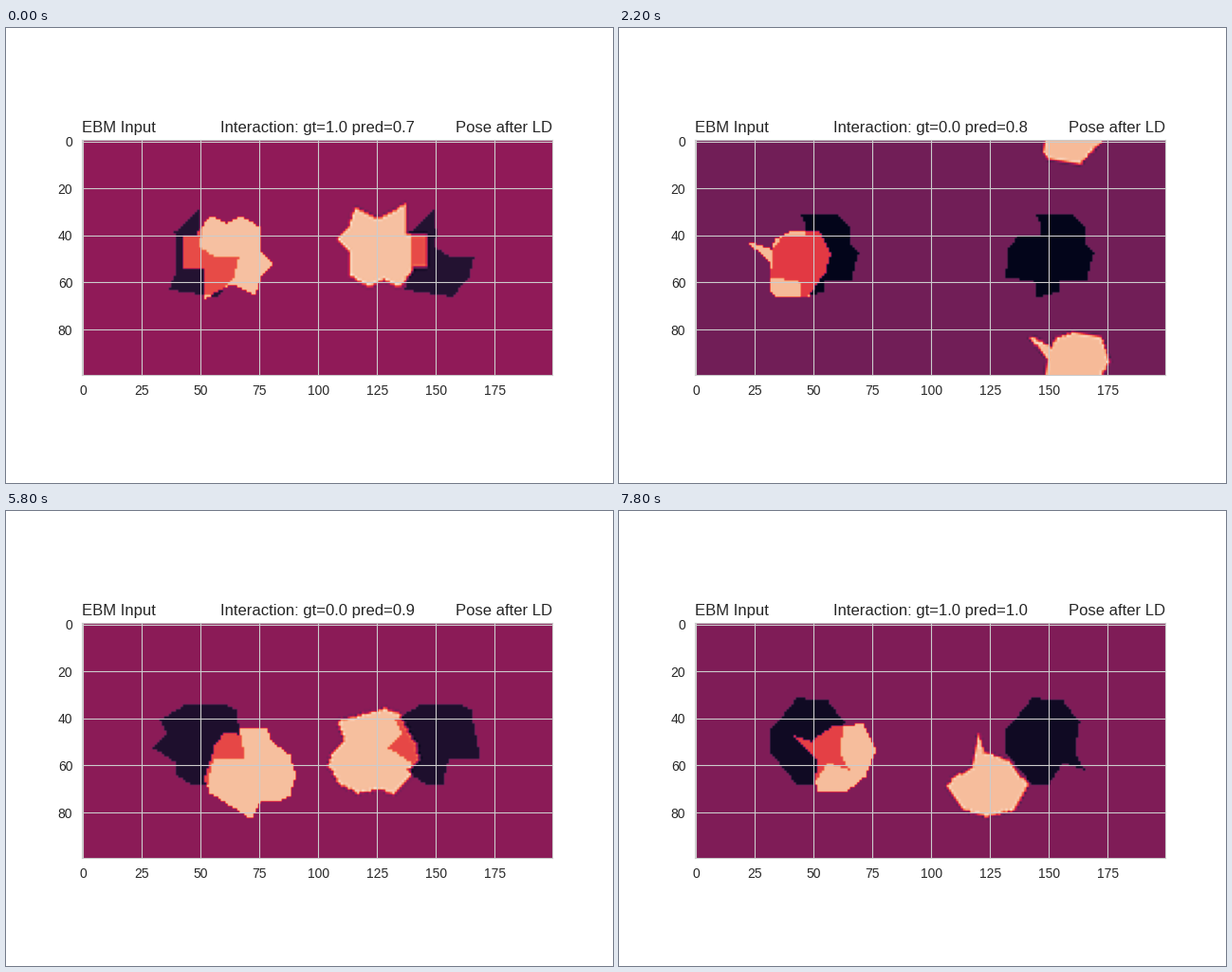
These frames come from a looping animation (640x480 px, 8000 ms). A matplotlib script:

```python
import numpy as np
import matplotlib.pyplot as plt
from matplotlib.animation import FuncAnimation
from matplotlib.colors import LinearSegmentedColormap
from matplotlib.path import Path

plt.rcParams.update({
    "font.family": "Liberation Sans", "text.color": "0.15",
    "xtick.labelcolor": "0.15", "ytick.labelcolor": "0.15",
    "axes.edgecolor": "0.8", "axes.axisbelow": True, "grid.color": "0.8",
})

N = 100            # cells per panel side
STEPS = 10         # Langevin steps shown per example
MID = (N - 1) / 2
PAD = 30
TOP = 2.43         # upper colour limit
rocket = LinearSegmentedColormap.from_list("rocket", [
    "#03051a", "#35193e", "#701f57", "#ad1759",
    "#e13342", "#f37651", "#f6b48f", "#faebdd"])

ROWS, COLS = np.mgrid[0:N, 0:N].astype(float)
CELLS = np.column_stack([COLS.ravel(), ROWS.ravel()])


def blob(*corners):
    """Rasterise a polygon on the panel grid."""
    return Path(corners).contains_points(CELLS).reshape(N, N).astype(float)


def cubic(t, a=-0.75):
    """Cubic convolution kernel; its overshoot gives the light rims."""
    t = np.abs(t)
    near = (a + 2) * t**3 - (a + 3) * t**2 + 1
    far = a * (t**3 - 5 * t**2 + 8 * t - 4)
    return np.where(t <= 1, near, np.where(t < 2, far, 0))


def move(mask, dx, dy, angle):
    """Rotate about the panel centre, then shift with wrap-around."""
    c, s = np.cos(np.radians(angle)), np.sin(np.radians(angle))
    u = (COLS - MID - dx + N / 2) % N - N / 2
    v = (ROWS - MID - dy + N / 2) % N - N / 2
    x, y = c * u + s * v + MID, -s * u + c * v + MID
    x0, y0 = np.floor(x).astype(int), np.floor(y).astype(int)
    padded = np.pad(mask, PAD)
    out = np.zeros((N, N))
    for i in range(-1, 3):
        for j in range(-1, 3):
            weight = cubic(x - x0 - i) * cubic(y - y0 - j)
            out += weight * padded[y0 + j + PAD, x0 + i + PAD]
    return out


# start and end: dx, dy, angle, lower colour limit
EXAMPLES = [
    dict(gt=1.0, pred=0.7,
         receptor=blob((49, 29.5), (50.4, 40), (49, 45), (55, 49), (66.5, 49),
                       (64, 58), (57, 66.4), (36.5, 63.4), (40, 55),
                       (39, 39)),
         ligand=blob((42.5, 41), (43, 54.4), (51.5, 55), (51.5, 67.4),
                     (63, 61), (73, 65.6), (76, 58), (81, 52.6), (75.4, 47),
                     (75.4, 37), (67, 32), (61, 35), (54, 32), (48, 40)),
         start=(-10.2, -4.6, 180, -1.37), end=(-31.4, 8.8, 184, -0.9)),
    dict(gt=0.0, pred=0.8,
         receptor=blob((44, 31), (59, 31), (65.5, 37), (65, 43), (69, 48),
                       (66, 59), (54.4, 59), (54.4, 64.4), (45, 66.5),
                       (44, 60), (31.6, 58), (33, 46), (37, 40.6),
                       (46.6, 41), (46.6, 36)),
         ligand=blob((21.5, 43), (32, 46), (34, 42), (41, 38), (52, 38),
                     (57.4, 48), (55, 56), (48, 66.4), (34, 66.4),
                     (31.6, 64), (32, 52)),
         start=(23.4, 44.2, 10, -1), end=(-23.4, 44.2, 4, -1)),
    dict(gt=0.0, pred=0.9,
         receptor=blob((30, 53), (36, 47), (33, 41), (43, 35), (60, 34),
                       (65, 37), (69, 57.4), (55.4, 57.4), (53, 68.4),
                       (46, 68.4), (39.5, 64), (39.5, 59)),
         ligand=blob((60, 46.6), (66, 47), (67, 44.6), (78.4, 44.6),
                     (80, 50), (88, 56), (90.6, 64), (88, 73), (84, 75.4),
                     (75.4, 75.4), (72, 82.4), (70, 82), (54, 72),
                     (51.5, 66), (56, 52)),
         start=(0.2, -1, 203.5, -1.48), end=(-1.6, -1.2, 133, -1.3)),
    dict(gt=1.0, pred=1.0,
         receptor=blob((43, 31.6), (56, 33), (63, 42), (61, 55), (65, 62),
                       (56, 59), (50, 68.4), (43, 68.4), (31.6, 55),
                       (31.6, 45), (38, 38)),
         ligand=blob((40.5, 47.5), (49, 50), (58, 44), (71, 42.6),
                     (76.5, 54), (72, 65), (64, 71.4), (52, 71.4),
                     (50.5, 67), (52, 58)),
         start=(-24.9, 4.2, 44.4, -1.46), end=(-26.2, 5.1, 55.3, -1.15)),
]

fig, ax = plt.subplots(figsize=(6.4, 4.8), dpi=100)
image = ax.imshow(np.zeros((N, 2 * N)), cmap=rocket, vmin=-1, vmax=TOP)
ax.set_xticks(range(0, 2 * N, 25))
ax.set_yticks(range(0, N, 20))
ax.tick_params(length=0, pad=7)
ax.grid(True)
ax.set_title("EBM Input", loc="left")
ax.set_title("Pose after LD", loc="right")
title = ax.set_title("")


def draw(frame):
    index, step = divmod(frame, STEPS)
    ex = EXAMPLES[index]
    start, end = np.array(ex["start"]), np.array(ex["end"])
    *pose, low = start + (end - start) * step / (STEPS - 1)
    before = 2 * ex["ligand"] - ex["receptor"]
    after = 2 * move(ex["ligand"], *pose) - ex["receptor"]
    image.set_data(np.hstack([before, after]))
    image.set_clim(min(low, -1), TOP)
    title.set_text(f"Interaction: gt={ex['gt']} pred={ex['pred']}")
    return image, title


anim = FuncAnimation(fig, draw, frames=STEPS * len(EXAMPLES), interval=200,
                     repeat=True, repeat_delay=0)
plt.show()
```
